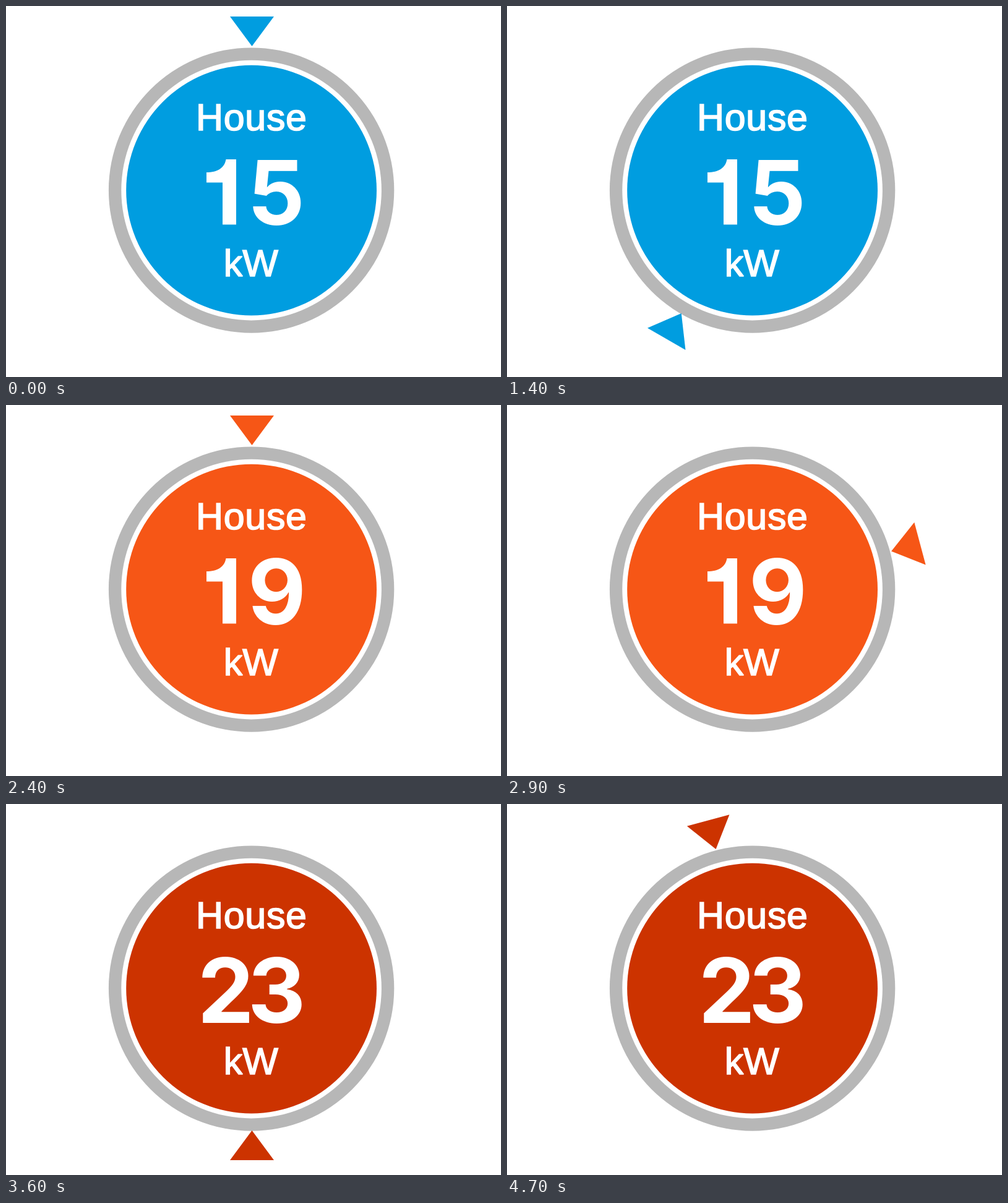
Write an HTML page with a canvas that moves like this. It is 800 px wide and 600 px high and loops after 4.8 s.

```html
<!DOCTYPE html>
<html lang="en">
<head>
<meta charset="utf-8">
<title>House power dial</title>
<style>
  html, body { margin: 0; width: 100%; height: 100%; overflow: hidden; background: #fff; }
  canvas { display: block; width: 800px; height: 600px; }
</style>
</head>
<body>
<canvas id="dial" width="800" height="600" role="img" aria-label="House power in kW"></canvas>
<script>
const ctx = document.getElementById('dial').getContext('2d');

const LOOP = 4800, STEP = 100, TURN_STEPS = 24;
const PIVOT = { x: 397.5, y: 296.5 };
const PHASES = [
  { from: 0, value: '15', color: '#009de0' },
  { from: 2400, value: '19', color: '#f65616' },
  { from: 3600, value: '23', color: '#cc3300' }
];
const LABEL_FONT = '61px "Liberation Sans", Arial, sans-serif';
const DIGIT_FONT = 'bold 145px Inter, "Liberation Sans", sans-serif';
const ONE = new Path2D('M372 248V353.5H350V285.5H324V269C342 269 353 262 355.5 248Z');

function disc(r, color) {
  ctx.fillStyle = color;
  ctx.beginPath();
  ctx.arc(396.6, 298.1, r, 0, Math.PI * 2);
  ctx.fill();
}

// Centres the visible ink, not the advance width.
function text(str, cx, baseline, font, weight = 0, spacing = 0) {
  ctx.font = font;
  ctx.letterSpacing = spacing + 'px';
  const m = ctx.measureText(str);
  const x = cx - (m.actualBoundingBoxRight - m.actualBoundingBoxLeft) / 2;
  ctx.fillText(str, x, baseline);
  if (weight) {
    ctx.lineWidth = weight;
    ctx.strokeText(str, x, baseline);
  }
}

function pointer(angle, color) {
  ctx.save();
  ctx.translate(PIVOT.x, PIVOT.y);
  ctx.rotate(angle);
  ctx.fillStyle = color;
  ctx.beginPath();
  ctx.moveTo(-35.5, -279.5);
  ctx.lineTo(35.5, -279.5);
  ctx.lineTo(0, -231.5);
  ctx.fill();
  ctx.restore();
}

function number(value) {
  if (value[0] === '1') ctx.fill(ONE);
  else text(value[0], 355, 353.5, DIGIT_FONT);
  text(value[1], 437.8, 353.5, DIGIT_FONT);
}

function draw(time) {
  const t = time % LOOP;
  const { value, color } = PHASES.filter(p => t >= p.from).pop();

  ctx.fillStyle = '#fff';
  ctx.fillRect(0, 0, 800, 600);
  disc(230.7, '#b7b7b7');
  disc(210.3, '#fff');
  disc(202.4, color);
  pointer(Math.floor(t / STEP) * 2 * Math.PI / TURN_STEPS, color);

  ctx.fillStyle = ctx.strokeStyle = '#fff';
  ctx.lineJoin = 'miter';
  ctx.miterLimit = 2;
  text('House', 398, 200.8, LABEL_FONT, 1.7, 0.7);
  number(value);
  text('kW', 398, 436.5, LABEL_FONT, 1.7);
}

function frame() {
  draw(performance.now());
  requestAnimationFrame(frame);
}
frame();
</script>
</body>
</html>
```
